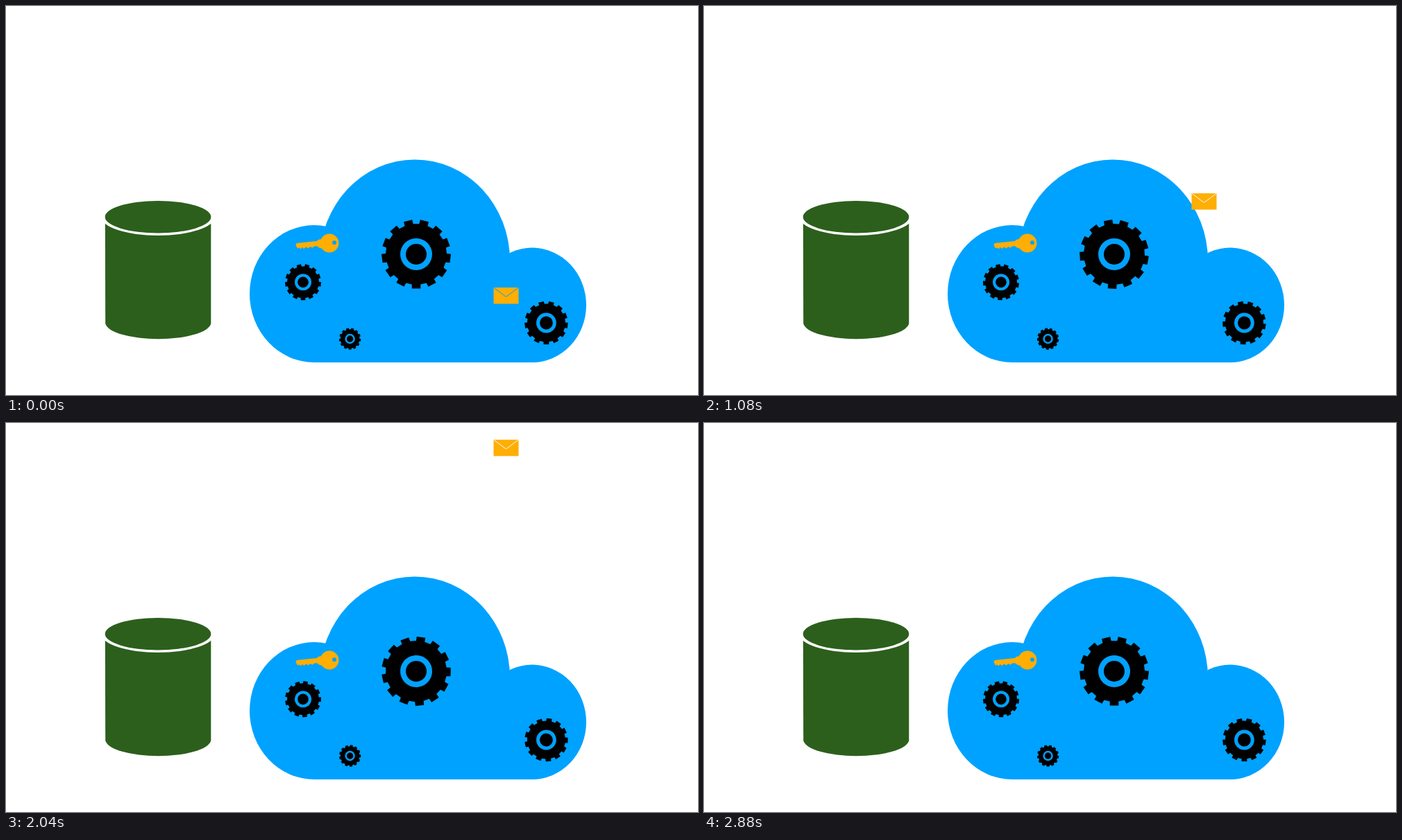
These frames come from a looping animation (997 by 561 pixels, 2920 ms). An HTML page:

```html
<!DOCTYPE html>
<html lang="en">
<head>
<meta charset="utf-8">
<title>Cloud, gears and mail</title>
<style>
  html, body { margin: 0; width: 100%; height: 100%; overflow: hidden; background: #fff; }
  svg { display: block; width: 997px; height: 561px; }
  .sky { fill: #00a2ff; }
  .gold { fill: #ffae03; }
  .green { fill: #2c5f1c; }
</style>
</head>
<body>
<svg viewBox="0 0 997 561">
  <defs>
    <mask id="flap" maskUnits="userSpaceOnUse" x="-1" y="-1" width="39" height="26">
      <rect x="-1" y="-1" width="39" height="26" fill="#fff"/>
      <path d="M.6 .4L16.6 12.4Q18 13.5 19.4 12.4L35.4 .4" fill="none" stroke="#000" stroke-width="1"/>
    </mask>
  </defs>

  <g class="green">
    <path d="M142.8 305H295.3V458A76.25 24 0 0 1 143.2 458Z"/>
    <ellipse cx="219" cy="304" rx="82" ry="27" fill="#fff"/>
    <ellipse cx="219" cy="304.2" rx="76.3" ry="23.3"/>
  </g>

  <g class="sky">
    <ellipse cx="444" cy="415" rx="93" ry="99"/>
    <ellipse cx="589" cy="367" rx="137" ry="145.5"/>
    <ellipse cx="758" cy="431.3" rx="78" ry="82.7"/>
    <rect x="444" y="431" width="314" height="83"/>
  </g>

  <g class="gold">
    <circle cx="466" cy="342" r="13.4"/>
    <path d="M417.3 344.6L419 341.9L448 339L450 337L455 336V349.8L451 348.6L448 346.2L444 346.6L441.5 348.8L438.5 347L435.5 349.4L432.5 347.6L429 350L427 347.8L424.5 350.6L422.5 348.4L420 349.6Z"/>
  </g>
  <circle class="sky" cx="473" cy="341.2" r="3"/>

  <g id="gears"></g>

  <g id="mail"><rect class="gold" width="36" height="23.5" mask="url(#flap)"/></g>
</svg>
<script>
const STEP = 40, RUN = 2880, LOOP = 2920;
const TEETH = 13;
const GEARS = [[591, 358, 50], [428, 398.3, 26.1], [495.6, 480, 15.7], [778.4, 457, 31.3]];
const MAIL = { x: 702.5, y: 406, rise: 464 };

const svgNode = (name, attrs, parent) => {
  const node = document.createElementNS("http://www.w3.org/2000/svg", name);
  for (const key in attrs) node.setAttribute(key, attrs[key]);
  return parent.appendChild(node);
};

// Outline of a gear with outer radius 1, one tooth pointing straight down.
function gearPath() {
  const corners = [[-8.2, 0.88], [-7.2, 1], [7.2, 1], [8.2, 0.88]];
  const points = [];
  for (let i = 0; i < TEETH; i++) {
    for (const [offset, r] of corners) {
      const a = (90 + i * 360 / TEETH + offset) * Math.PI / 180;
      points.push((r * Math.cos(a)).toFixed(4) + " " + (r * Math.sin(a)).toFixed(4));
    }
  }
  return "M" + points.join("L") + "Z";
}

const outline = gearPath();
const gears = GEARS.map(([x, y, r]) => {
  const g = svgNode("g", {}, document.getElementById("gears"));
  svgNode("path", { d: outline }, g);
  svgNode("circle", { r: 0.46, class: "sky" }, g);
  svgNode("circle", { r: 0.3 }, g);
  return { g, x, y, r };
});
const mail = document.getElementById("mail");

// cubic-bezier(.42, 0, .58, 1), solved by bisection
function easeInOut(p) {
  let lo = 0, hi = 1;
  for (let i = 0; i < 24; i++) {
    const s = (lo + hi) / 2, q = 1 - s;
    const x = 3 * q * s * (0.42 * q + 0.58 * s) + s * s * s;
    if (x < p) lo = s; else hi = s;
  }
  return lo * lo * (3 - 2 * lo);
}

function draw(ms) {
  const p = Math.floor(ms % LOOP / STEP) * STEP / RUN;
  for (const { g, x, y, r } of gears) {
    g.setAttribute("transform", `translate(${x} ${y}) scale(${r}) rotate(${-360 * p})`);
  }
  const top = MAIL.y - MAIL.rise * easeInOut(p);
  mail.setAttribute("transform", `translate(${MAIL.x} ${top.toFixed(2)})`);
}

const start = performance.now();
function tick() {
  draw(performance.now() - start);
  requestAnimationFrame(tick);
}
tick();
</script>
</body>
</html>
```
